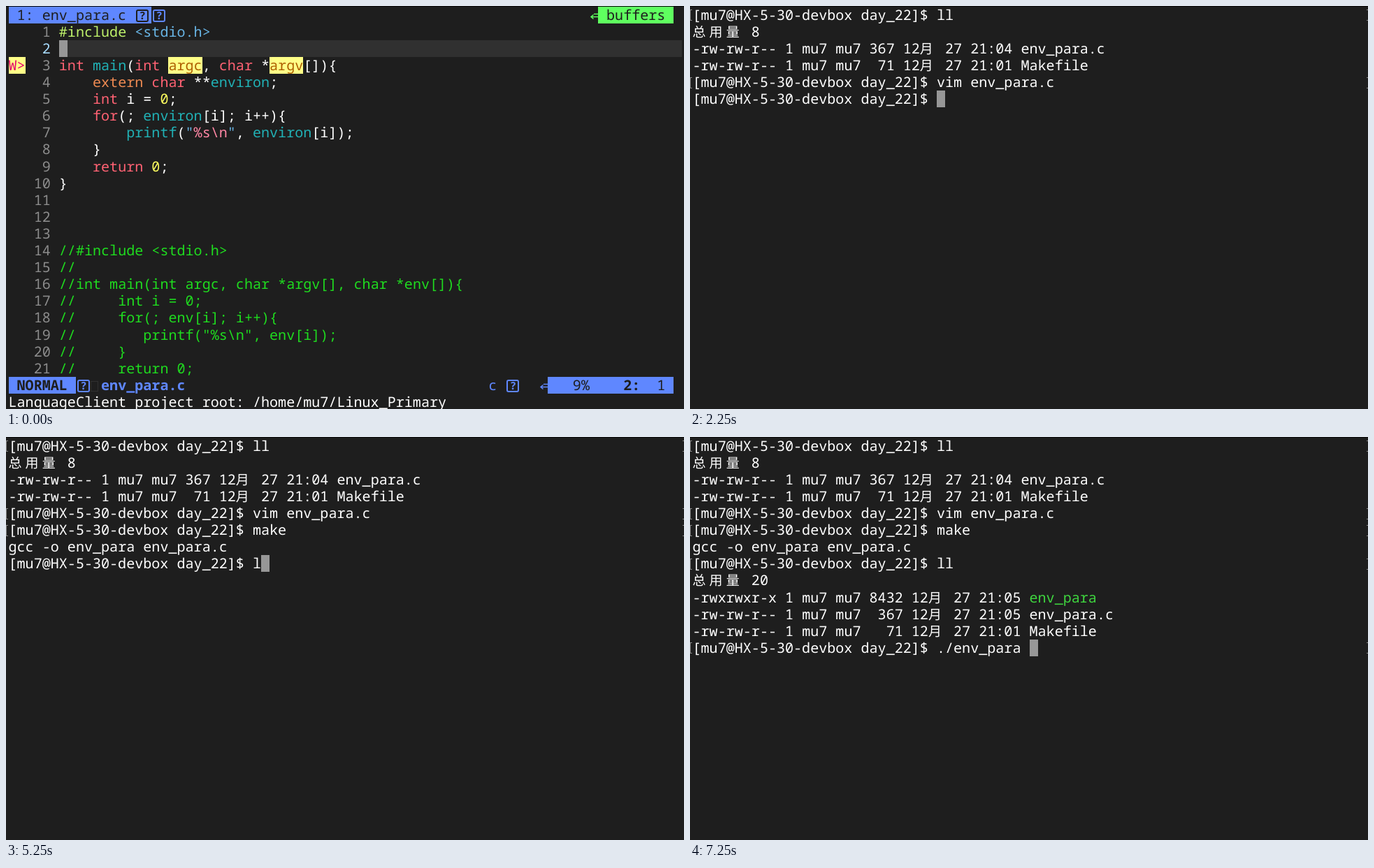
Animation of 970x577 px, one loop 8000 ms. Source, as an HTML page:

```html
<!DOCTYPE html>
<html lang="en">
<head>
<meta charset="utf-8">
<title>Terminal session</title>
<style>
html, body { margin: 0; width: 100%; height: 100%; overflow: hidden; background: #1e1e1e; }
#stage {
  position: relative; width: 970px; height: 577px; overflow: hidden;
  background: #1e1e1e; color: #fff;
  font: 500 20.08px/24.1px "Noto Sans Mono", "DejaVu Sans Mono", monospace;
  font-variant-ligatures: none; text-rendering: geometricPrecision;
  white-space: pre;
}
#stage::after { content: ""; position: absolute; inset: 0 0 auto; height: 1px; background: #080808; }
#stage > * { position: absolute; height: 24.1px; }
.cjk { font: 500 19px/24.1px "Noto Sans CJK SC", "Noto Sans CJK", sans-serif; }
.blue { color: #5f87ff; }
.bold { font-weight: 700; }
.dark { color: #1e1e1e; }
.green { color: #3fd53f; }
.lnum { color: #8c8c8c; }
.here { color: #a8dcff; }
.com { color: #1fdb1f; }
.inc { color: #bdf06a; }
.str { color: #68b4e4; }
.key { color: #ff6273; }
.ext { color: #ee8a52; }
.fn { color: #21b1b5; }
.num { color: #ffff5f; }
.fmt { color: #ff87a5; }
.warn { color: #af5f00; background: #ffff87; }
.sign { color: #e4006c; background: #ffff87; }
.icon i {
  position: absolute; left: 2px; top: 4.3px; width: 14px; height: 14px;
  border: 2px solid; border-radius: 3px; text-align: center;
  font: 700 15px/14px "Noto Sans Mono", monospace;
}
.ghost i { position: absolute; left: -3px; top: 6px; width: 9px; height: 13px; border: 1px solid #303030; }
.arrow { width: 13px; fill: none; stroke: currentColor; stroke-width: 1.5; }
.arrow.lime { color: #5fff5f; }
.mark i {
  position: absolute; top: 4.5px; width: 2px; height: 14px;
  border: 1px solid #858585; border-right: 0;
}
</style>
</head>
<body>
<div id="stage"></div>
<script>
const LOOP = 8000, SHELL = 2250;
const CELL_W = 12.05, CELL_H = 24.1, LEFT = 3.5, TOP = 0.6;
const BLUE = '#5f87ff';
const stage = document.getElementById('stage');
const timed = [];

function place(el, row, col, from, to) {
  el.style.left = LEFT + col * CELL_W + 'px';
  el.style.top = TOP + row * CELL_H + 'px';
  stage.append(el);
  timed.push({ el, from, to });
  return el;
}

function box(row, col, cls, html, from, to) {
  const el = document.createElement('span');
  el.className = cls;
  el.innerHTML = html;
  return place(el, row, col, from, to);
}

function fill(row, col, cols, color, from, to) {
  const el = box(row, col, '', '', from, to);
  el.style.width = cols * CELL_W + 'px';
  el.style.background = color;
}

// Places each word on the character grid; CJK glyphs take two cells.
function put(row, col, text, cls, from, to) {
  let wide = 0;
  for (const m of text.matchAll(/[\u4e00-\u9fff]|[^\s\u4e00-\u9fff]+/g)) {
    const isWide = m[0] >= '\u4e00' && m[0] <= '\u9fff';
    const el = box(row, col + m.index + wide, isWide ? cls + ' cjk' : cls, '', from, to);
    el.textContent = m[0];
    if (isWide) wide++;
  }
}

// ---- Editor ----
const syntax = new RegExp([
  '(?<com>^//.*)', '(?<inc>#include)', '(?<str><.*?>|")',
  '(?<key>\\b(?:int|char|for|return)\\b)', '(?<ext>extern)',
  '(?<fn>main|environ|printf)', '(?<warn>arg[cv])', '(?<num>0)',
  '(?<fmt>%s\\\\n)', '(?<txt>\\w+|[^\\w\\s"]+?)'
].join('|'), 'g');

const code = String.raw`#include <stdio.h>

int main(int argc, char *argv[]){
    extern char **environ;
    int i = 0;
    for(; environ[i]; i++){
        printf("%s\n", environ[i]);
    }
    return 0;
}



//#include <stdio.h>
//
//int main(int argc, char *argv[], char *env[]){
//     int i = 0;
//     for(; env[i]; i++){
//        printf("%s\n", env[i]);
//     }
//     return 0;`.split('\n');

const edit = (row, col, text, cls, from = 0, to = SHELL) => put(row, col, text, cls, from, to);
const icon = (row, col, cls, from = 0, to = SHELL) => box(row, col, 'icon ' + cls, '<i>?</i>', from, to);
const arrow = (row, col, cls) => box(row, col, cls,
  '<svg class="arrow ' + cls + '" height="24"><path d="M13 10.5H6M13 14.5H2M5.5 11.5L2 14.5L5.5 17.5"/></svg>', 0, SHELL);

fill(0, 0, 17, BLUE, 0, SHELL);
edit(0, 1, '1: env_para.c', 'dark');
icon(0, 15, 'dark');
icon(0, 17, 'blue');
arrow(0, 69, 'lime');
fill(0, 70, 9, '#5fff5f', 0, SHELL);
edit(0, 71, 'buffers', 'dark');

fill(2, 6, 74, '#303030', 0, SHELL);
edit(3, 0, 'W>', 'sign');
code.forEach((line, i) => {
  const row = i + 1;
  edit(row, 3, String(row).padStart(2), row === 2 ? 'here' : 'lnum');
  for (const m of line.matchAll(syntax)) {
    const cls = Object.keys(m.groups).find(k => m.groups[k] !== undefined);
    edit(row, 6 + m.index, m[0], cls);
  }
});

function mode(name, from, to) {
  const end = name.length + 2;
  fill(22, 0, end, BLUE, from, to);
  edit(22, 1, name, 'dark bold', from, to);
  icon(22, end, 'blue', from, to);
  box(22, end + 2, 'ghost', '<i></i>', from, to);
  edit(22, end + 3, 'env_para.c', 'blue bold', from, to);
}
mode('NORMAL', 0, 1250);
mode('COMMAND', 1250, SHELL);
edit(22, 57, 'c', 'blue');
icon(22, 59, 'blue');
arrow(22, 63, 'blue');
fill(22, 64, 15, BLUE, 0, SHELL);
edit(22, 67, '9%', 'dark');
edit(22, 73, '2:', 'dark bold');
edit(22, 77, '1', 'dark');

edit(23, 0, 'LanguageClient project root: /home/mu7/Linux_Primary', '', 0, 250);
edit(23, 0, '"env_para.c" 22L, 367C written', '', 250, 1250);
edit(23, 0, ':', '', 1250);
edit(23, 1, 'q', '', 1500);

// ---- Shell ----
const PROMPT = '[mu7@HX-5-30-devbox day_22]$';
const IN = PROMPT.length + 1;
const shell = (row, col, text, from = SHELL, cls = '') => put(row, col, text, cls, from, LOOP);

function prompt(row, from, markFrom) {
  shell(row, 0, PROMPT, from);
  const mark = box(row, 0, 'mark',
    '<i style="left:0"></i><i style="left:968px;transform:scaleX(-1)"></i>', markFrom, LOOP);
  mark.style.left = 0;
}

prompt(0, SHELL, SHELL);
shell(0, IN, 'll');
shell(1, 0, '总用量 8');
shell(2, 0, '-rw-rw-r-- 1 mu7 mu7 367 12月 27 21:04 env_para.c');
shell(3, 0, '-rw-rw-r-- 1 mu7 mu7  71 12月 27 21:01 Makefile');
prompt(4, SHELL, SHELL);
shell(4, IN, 'vim env_para.c');

prompt(5, SHELL, 4250);
shell(5, IN, 'm', 3250);
shell(5, IN + 1, 'ak', 3500);
shell(5, IN + 3, 'e', 3750);
shell(6, 0, 'gcc -o env_para env_para.c', 4250);

prompt(7, 4250, 5500);
shell(7, IN, 'l', 5250);
shell(7, IN + 1, 'l', 5500);
shell(8, 0, '总用量 20', 5750);
shell(9, 0, '-rwxrwxr-x 1 mu7 mu7 8432 12月 27 21:05', 5750);
shell(9, 40, 'env_para', 5750, 'green');
shell(10, 0, '-rw-rw-r-- 1 mu7 mu7  367 12月 27 21:05 env_para.c', 5750);
shell(11, 0, '-rw-rw-r-- 1 mu7 mu7   71 12月 27 21:01 Makefile', 5750);

prompt(12, 5750, 7000);
shell(12, IN, '.', 6500);
shell(12, IN + 1, '/', 6750);
shell(12, IN + 2, 'env_para', 7250);

// ---- Cursor: time, row, column ----
const cursor = [
  [0, 2, 6], [1250, 23, 1], [1500, 23, 2],
  [SHELL, 5, IN], [3250, 5, IN + 1], [3500, 5, IN + 3], [3750, 5, IN + 4],
  [4250, 7, IN], [5250, 7, IN + 1], [5500, 7, IN + 2],
  [5750, 12, IN], [6500, 12, IN + 1], [6750, 12, IN + 2], [7250, 12, IN + 11]
];
cursor.forEach(([from, row, col], i) =>
  fill(row, col, 1, '#979797', from, cursor[i + 1]?.[0] ?? LOOP));

// ---- Playback ----
const start = performance.now();
function draw() {
  const t = (performance.now() - start) % LOOP;
  for (const { el, from, to } of timed) {
    el.style.visibility = t >= from && t < to ? 'visible' : 'hidden';
  }
  requestAnimationFrame(draw);
}
draw();
</script>
</body>
</html>
```
